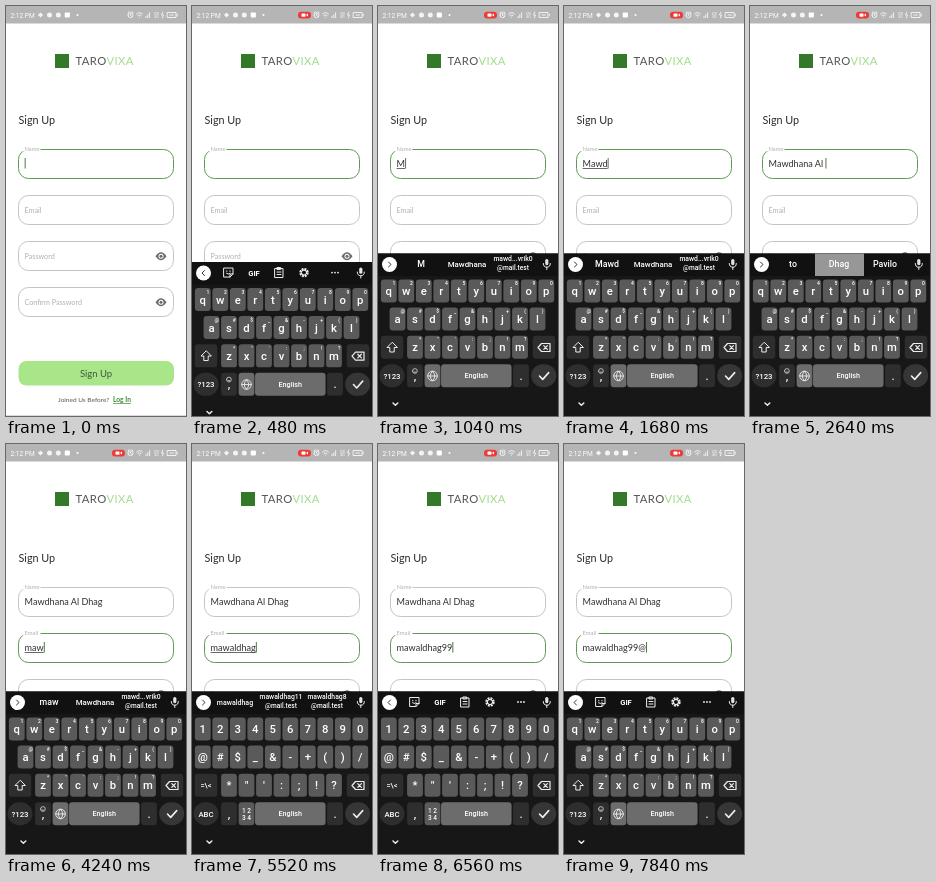
These frames come from a looping animation (180x410 px, 8 s). An HTML page:

```html
<!DOCTYPE html>
<html lang="en">
<head>
<meta charset="utf-8">
<title>Sign Up</title>
<style>
  html, body { margin: 0; width: 100%; height: 100%; overflow: hidden; background: #fff; }
  svg { display: block; width: 180px; height: 410px; }
  text { font-family: Lato, sans-serif; white-space: pre; }
  .ui text { font-family: Roboto, sans-serif; fill: #fff; }
  .keys text { font-weight: 500; }
  .mid { text-anchor: middle; }
  .line { fill: none; stroke: #eee; stroke-width: 1; stroke-linecap: round; stroke-linejoin: round; }
  .box { fill: #fff; stroke: #c4c4c4; stroke-width: 1; }
  .box.focus { stroke: #5d9a52; }
  .hint { fill: #b0b0b0; font-size: 7.2px; }
  .value { fill: #303030; font-size: 9.1px; }
</style>
</head>
<body>
<svg id="stage" viewBox="0 0 180 410"></svg>
<script>
const LOOP = 8000, PRESS = 80, BLINK = 480;
const stage = document.getElementById('stage');

function el(tag, attrs, parent = stage, text) {
  const node = document.createElementNS('http://www.w3.org/2000/svg', tag);
  for (const k in attrs) node.setAttribute(k, attrs[k]);
  if (text !== undefined) node.textContent = text;
  parent.appendChild(node);
  return node;
}
const rect = (x, y, width, height, rx, fill, parent) => el('rect', { x, y, width, height, rx, fill }, parent);
const dot = (cx, cy, r, fill, parent) => el('circle', { cx, cy, r, fill }, parent);
const line = (d, parent, style = '') => el('path', { class: 'line', d, style }, parent);
const word = (x, y, size, text, parent, extra) => el('text', { x, y, 'font-size': size, ...extra }, parent, text);
const mid = (x, y, size, text, parent, extra) => word(x, y, size, text, parent, { class: 'mid', ...extra });
const show = (node, on) => node.setAttribute('display', on ? 'inline' : 'none');
const clamp = v => Math.max(0, Math.min(1, v));

// Form
rect(0, 0, 180, 410, 0, '#fff');
rect(0, 409, 180, 1, 0, '#d9d9d9');
rect(49, 48, 14, 14, 0, '#34782a');
const brand = word(69.5, 59, 11.3, '', stage, { 'letter-spacing': 0.4 });
el('tspan', { fill: '#555' }, brand, 'TARO');
el('tspan', { fill: '#a3dc8c' }, brand, 'VIXA');
word(12.5, 117.5, 10.8, 'Sign Up', stage, { fill: '#2c2c2c' });

function eye(y) {
  el('path', { d: `M149.5 ${y}Q155 ${y - 8} 160.5 ${y}Q155 ${y + 8} 149.5 ${y}Z`, fill: '#6b6b6b' });
  dot(155, y, 2.5, '#fff');
  dot(155, y, 1.5, '#6b6b6b');
}
function field(y, hint) {
  const box = el('rect', { class: 'box', x: 12.5, y, width: 155, height: 29, rx: 10 });
  const notch = rect(16.5, y - 2, 18, 4, 0, '#fff');
  const label = el('text', { class: 'hint', x: 18.5 }, stage, hint);
  const value = el('text', { class: 'value', x: 18.6, y: y + 17 });
  const under = rect(18.6, y + 18.5, 0, 0.8, 0, '#444');
  const caret = rect(0, y + 8.5, 0.9, 10.5, 0, '#3c6a34');
  return {
    set(text, focus, lift, composing, blink) {
      box.classList.toggle('focus', focus);
      show(notch, lift > 0);
      label.setAttribute('y', y + 17.5 - 15.7 * lift);
      label.style.fontSize = 7.2 - 1.4 * lift + 'px';
      if (value.textContent !== text) value.textContent = text;
      const w = text ? value.getComputedTextLength() : 0;
      under.setAttribute('width', composing ? w : 0);
      caret.setAttribute('x', 18.7 + w);
      show(caret, focus && blink);
    }
  };
}
const nameField = field(143.5, 'Name');
const mailField = field(189.5, 'Email');
for (const [y, hint] of [[235.5, 'Password'], [281.5, 'Confirm Password']]) {
  field(y, hint).set('', false, 0, false, false);
  eye(y + 14.7);
}
rect(12.5, 355, 155.5, 24.5, 8, '#a9e68a');
mid(90, 370.5, 9.5, 'Sign Up', stage, { fill: '#40573a' });
word(52, 396, 6.5, 'Joined Us Before?', stage, { fill: '#555' });
word(107, 396, 6.7, 'Log In', stage, { fill: '#3f8a35', 'font-weight': 700, 'text-decoration': 'underline' });

// Status bar
const status = el('g', { class: 'ui' });
rect(0, 0, 180, 17.5, 0, '#b5b5b5', status);
word(4.5, 11.5, 6.6, '2:12 PM', status);
el('path', { d: 'M34.5 6.4l2.6 2.6-2.6 2.6-2.6-2.6z', fill: '#f4f4f4' }, status);
dot(43.5, 9, 2.5, '#f4f4f4', status);
dot(52.3, 9, 2.5, '#f4f4f4', status);
rect(58.7, 6.4, 5.2, 5.2, 1, '#fff', status);
dot(71.5, 9, 1, '#fff', status);
const badge = el('g', {}, status);
rect(106, 5.8, 13, 6.6, 3, '#ee3b36', badge);
rect(109.5, 7.5, 4, 3.2, 0.6, '#fff', badge);
el('path', { d: 'M114 9l2-1.4v2.8z', fill: '#fff' }, badge);
const thin = 'stroke:#fff;stroke-width:.8';
line('M122 9.2a2.5 2.5 0 1 0 5 0a2.5 2.5 0 1 0-5 0M124.5 7.8v1.6l1 .6M122 6.8l1.1-1M127 6.8l-1.1-1', status, thin);
line('M130.5 8q3-3 6 0M131.8 9.6q1.7-1.7 3.4 0M133.4 11.2h.2', status, thin);
line('M140 11.7v-1.5M141.8 11.7v-3M143.6 11.7v-5', status, thin);
mid(150.5, 8.8, 3.6, 'LTE', status);
mid(150.5, 12, 3.6, '4G', status);
line('M156.8 6l-1.3 3h2l-1.2 3', status, thin);
line('M161.5 6.5h8.5v5h-8.5zM171.2 8v2M164 9h3.5', status, thin);

// Keyboard
const BG = '#171717', KEY = '#5a5a5a', DARK = '#2e2e2e', LIT = '#6c6c6c';
const board = el('g', { class: 'ui keys' });
rect(0, 247.5, 180, 175, 0, BG, board);
rect(0, 247.5, 180, 22.5, 0, '#111', board);

const hit = {};
function key(parent, x, y, w, label, { small, fill = KEY, size = 11.3, rx = 3.2 } = {}) {
  rect(x - w / 2, y - 11.5, w, 23, rx, fill, parent);
  if (label) mid(x, y + size * 0.36, size, label, parent);
  if (small) mid(x + 5.2, y - 6, 5, small, parent);
  if (label.length === 1) hit[label] = { x, y };
}
function row(parent, keys, x, y, smalls = '') {
  [...keys].forEach((k, i) => key(parent, x + 17.5 * i, y, 15.8, k, { small: smalls[i] }));
}
function layout(parent, first, second, third, x2, left, shift) {
  row(parent, first[0], 10.8, 285, first[1]);
  row(parent, second[0], x2, 313, second[1]);
  row(parent, third[0], 37, 341.3, third[1]);
  key(parent, 14, 341.3, 22.5, shift, { fill: DARK, size: 7.5 });
  key(parent, 14, 369.7, 25, left, { fill: DARK, size: 7.8, rx: 11.5 });
  key(parent, 37, 369.7, 15.8, ',', { fill: DARK });
}
const letters = el('g', {}, board), symbols = el('g', {}, board);
layout(letters, ['qwertyuiop', '1234567890'], ['asdfghjkl', '@#$_&-+()'], ['zxcvbnm', '*"\':;!?'], 19.5, '?123', '');
line('M14 336.5l-5 5h2.8v4.5h4.4v-4.5h2.8z', letters);
line('M34.5 365a2.4 2.4 0 1 0 4.8 0a2.4 2.4 0 1 0-4.8 0M36 366q1 .9 1.9 0', letters, 'stroke-width:.7');
key(letters, 54.5, 369.7, 15.8, '', { fill: LIT });
line('M49.7 370a4.8 4.8 0 1 0 9.6 0a4.8 4.8 0 1 0-9.6 0h9.6M54.5 365.2q-4.6 4.8 0 9.6q4.6-4.8 0-9.6', letters, 'stroke-width:.9');

layout(symbols, ['1234567890'], ['@#$_&-+()/'], ['*"\':;!?'], 10.8, 'ABC', '=\\<');
key(symbols, 54.5, 369.7, 15.8, '');
mid(54.5, 368.5, 6.5, '1 2', symbols);
mid(54.5, 376, 6.5, '3 4', symbols);

key(board, 98.3, 369.7, 70.5, 'English', { fill: LIT, size: 7.2 });
key(board, 143, 369.7, 15.8, '.', { fill: DARK });
key(board, 166, 341.3, 22.5, '', { fill: DARK });
line('M160 341.5l3.5-4h8.5v8h-8.5zM165.8 339.7l3.6 3.6M169.4 339.7l-3.6 3.6', board, 'stroke-width:1.2');
key(board, 165.7, 369.7, 25, '', { fill: '#363636', rx: 11.5 });
line('M161.5 370l3.2 3.4 6-6.8', board, 'stroke-width:1.6');
line('M15 397l2.4 2.2 2.4-2.2', board, 'stroke-width:1.5');

// Strip above the keys
const tools = el('g', {}, board), hints = el('g', {}, board);
line('M32 253.5h9v6l-3 3h-6zM41 259.5h-3v3M34.8 256.3v.6M38 256.3v.6M34.5 258.8q1.8 1.6 3.6 0', tools);
mid(62, 261, 7.6, 'GIF', tools, { style: 'font-weight:700' });
line('M83 254h8v9h-8zM85.3 253h3.4v2h-3.4zM85 257.5h4M85 260h4', tools);
const gear = el('circle', { class: 'line', cx: 112, cy: 258, r: 3.4, 'stroke-dasharray': '1.8 0.87' }, tools);
gear.style.cssText = 'stroke-width:2.6;stroke-linecap:butt';
el('circle', { class: 'line', cx: 112, cy: 258, r: 2.6 }, tools);
for (const x of [140, 143, 146]) dot(x, 258, 0.9, '#eee', tools);
const pick = rect(65, 247.5, 49, 22.5, 0, '#979797', hints);
const slots = [43, 89, 135].map(x => [
  mid(x, 261.3, 8.8, '', hints),
  mid(x, 255.4, 6.8, '', hints),
  mid(x, 264.2, 6.6, '', hints)
]);
dot(11.5, 258.5, 7.5, '#fff', board);
const arrow = line('', board, 'stroke:#333');
rect(167.2, 253, 3.2, 6.2, 1.6, '#e4e4e4', board);
line('M165.3 257.5q0 3.7 3.5 3.7t3.5-3.7M168.8 261.2v2.3', board);

const popup = el('g', {}, board);
rect(-7.9, -11.5, 15.8, 23, 3.2, '#858585', popup);
rect(-9, -37, 18, 25, 4, '#747474', popup);
const popText = mid(0, -20, 13, '', popup);

// Script of the typing
const log = [], presses = [];
const add = (t, field, text, bar, composing = false) => log.push({ t, field, text, bar, composing });
function type(field, from, chars, times, bar) {
  times.forEach((t, i) => {
    const text = from + chars.slice(0, i + 1);
    presses.push([t - PRESS, chars[i].toLowerCase()]);
    add(t, field, text, bar && bar(text), !!bar);
  });
}
const guess = text => [text, 'Mawdhana', 'mawd...vrik0@mail.test'];
const mails = text => text.length < 5 ? guess(text) : [text, text + '11@mail.test', text + '8@mail.test'];
const picks = [[1920, 1], [2240, 0], [2640, 1]];
add(0, 0, '');
type(0, '', 'Mawd', [1040, 1200, 1440, 1680], guess);
add(2000, 0, 'Mawdhana ', ['Al', 'is', 'and']);
add(2320, 0, 'Mawdhana Al ', ['to', 'Dhag', 'Pavilo']);
add(2720, 0, 'Mawdhana Al Dhag', ['to', 'and', 'is']);
add(3120, 1, '');
type(1, '', 'mawaldhag', [3680, 3920, 4160, 4400, 4480, 4640, 4800, 4960, 5120], mails);
type(1, 'mawaldhag', '99@', [6320, 6560, 7520]);

const recent = (list, t) => list.find(([at]) => t >= at && t < at + PRESS);

function drawHints(bar, t) {
  const chosen = recent(picks, t);
  show(pick, chosen);
  if (chosen) pick.setAttribute('x', 19 + 46 * chosen[1]);
  slots.forEach(([one, top, low], i) => {
    const [head, host] = bar[i].split('@');
    one.textContent = host ? '' : head;
    one.setAttribute('font-size', Math.min(8.8, 63 / head.length));
    top.textContent = host ? head : '';
    low.textContent = host ? '@' + host : '';
  });
}
function drawPress(t) {
  const press = recent(presses, t);
  show(popup, press);
  if (!press) return;
  const { x, y } = hit[press[1]];
  popup.setAttribute('transform', `translate(${x} ${y})`);
  popText.textContent = press[1];
}
function draw(t) {
  const now = log.findLast(e => e.t <= t);
  const name = log.findLast(e => e.t <= t && e.field === 0);
  const onMail = now.field === 1;
  const blink = (t - now.t) % (2 * BLINK) < BLINK;
  nameField.set(name.text, !onMail, 1, !onMail && now.composing, blink);
  mailField.set(onMail ? now.text : '', onMail, clamp((t - 3040) / 200), onMail && now.composing, blink);

  const slide = 162 * Math.pow(1 - clamp((t - 160) / 440), 2.25);
  board.setAttribute('transform', `translate(0 ${slide})`);
  show(board, slide < 162);
  show(badge, t >= 80);

  const numeric = t >= 5520 && t < 7760;
  show(letters, !numeric);
  show(symbols, numeric);
  show(tools, !now.bar);
  show(hints, now.bar);
  arrow.setAttribute('d', now.bar ? 'M10.5 256l2.5 2.5-2.5 2.5' : 'M12.5 256l-2.5 2.5 2.5 2.5');
  if (now.bar) drawHints(now.bar, t);
  drawPress(t);
}

const start = performance.now();
function tick() {
  draw((performance.now() - start) % LOOP);
  requestAnimationFrame(tick);
}
tick();
</script>
</body>
</html>
```
